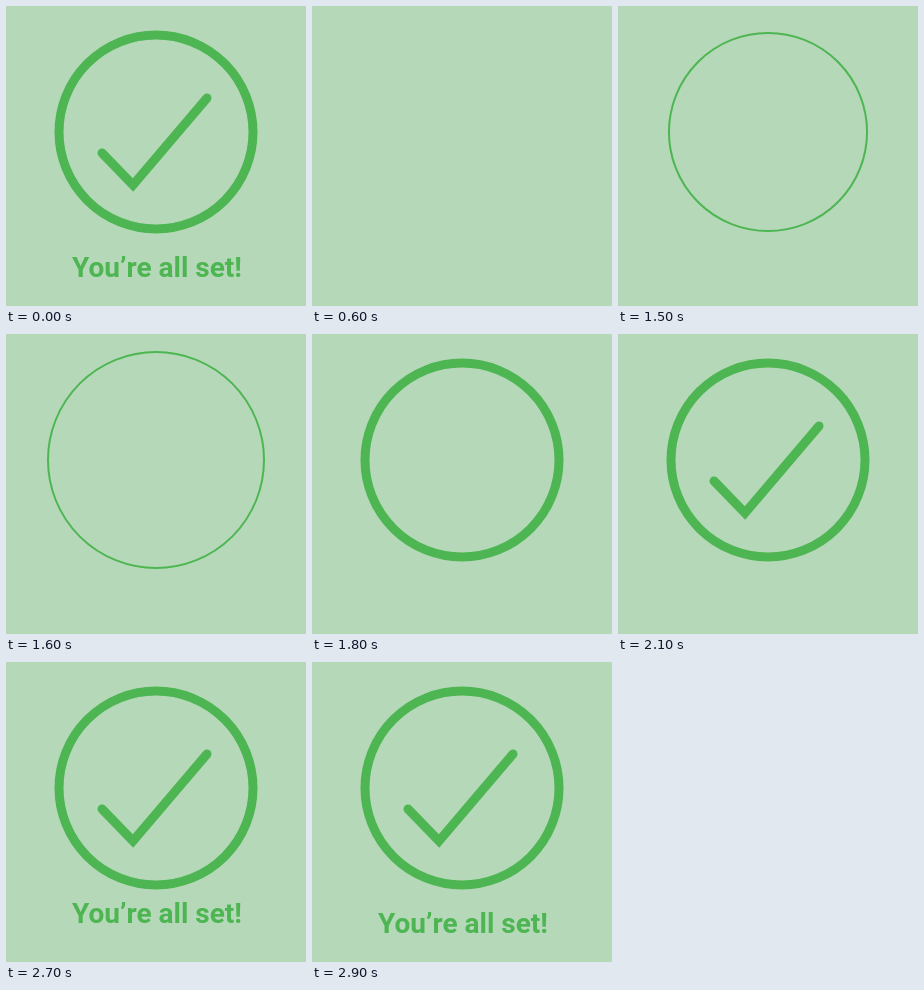
An HTML page for the animation above (3.5 s loop, 300x300 px).

```html
<!DOCTYPE html>
<html lang="en">
<head>
<meta charset="utf-8">
<title>All set</title>
<style>
  html, body { margin: 0; width: 100%; height: 100%; overflow: hidden; background: #b5d8b8; }
  svg { display: block; width: 100%; height: 100%; }
  .line { fill: none; stroke: #4db652; stroke-linecap: round; stroke-linejoin: miter; }
  text { font: 700 28px Roboto, sans-serif; fill: #4db652; text-anchor: middle; }
</style>
</head>
<body>
<svg viewBox="0 0 300 300">
  <filter id="smear" filterUnits="userSpaceOnUse" x="0" y="0" width="300" height="300" color-interpolation-filters="sRGB">
    <feGaussianBlur id="blur" stdDeviation="0"/>
  </filter>
  <circle id="ring" class="line" cx="150" cy="126"/>
  <path id="check" class="line" stroke-width="9" pathLength="1" d="M96 147 127 179 201 92"/>
  <g id="label"><text id="words" x="151">You’re all set!</text></g>
</svg>
<script>
const LOOP = 3500, STEP = 100, CLEAR = 600, DONE = 2900;
const el = id => document.getElementById(id);
const [ring, check, label, words, blur] = ['ring', 'check', 'label', 'words', 'blur'].map(el);

const progress = (t, from, to) => Math.min(1, Math.max(0, (t - from) / (to - from)));
const mix = (a, b, p) => a + (b - a) * p;
const smooth = p => (1 - Math.cos(Math.PI * p)) / 2;
const show = (node, on) => node.setAttribute('visibility', on ? 'visible' : 'hidden');

function drawRing(t) {
  const grow = Math.sin(progress(t, 1217, 1600) * Math.PI / 2);
  const settle = progress(t, 1600, 1800);
  show(ring, t >= 1300);
  ring.setAttribute('r', mix(108 * grow, 97, settle));
  ring.setAttribute('stroke-width', mix(2, 9, settle));
}

function drawCheck(t) {
  show(check, t >= 1900);
  check.setAttribute('stroke-dasharray', `${progress(t, 1800, 2100)} 2`);
}

// The words drop in, overshoot downwards, rebound and settle.
function drawWords(t) {
  const drop = mix(-160, 24, progress(t, 2300, 2500));
  const rebound = mix(drop, -12, smooth(progress(t, 2500, 2740)));
  const y = 271 + mix(rebound, 0, smooth(progress(t, 2740, DONE)));
  const smear = mix(6, 0, progress(t, 2300, 2700));
  show(label, t >= 2300);
  words.setAttribute('y', y);
  blur.setAttribute('stdDeviation', `${smear / 3} ${smear}`);
  if (smear) label.setAttribute('filter', 'url(#smear)');
  else label.removeAttribute('filter');
}

function draw(now) {
  const time = Math.floor(now % LOOP / STEP) * STEP;
  const t = time < CLEAR ? DONE : time;
  drawRing(t);
  drawCheck(t);
  drawWords(t);
}

const start = performance.now();
function tick() {
  draw(performance.now() - start);
  requestAnimationFrame(tick);
}
tick();
</script>
</body>
</html>
```
